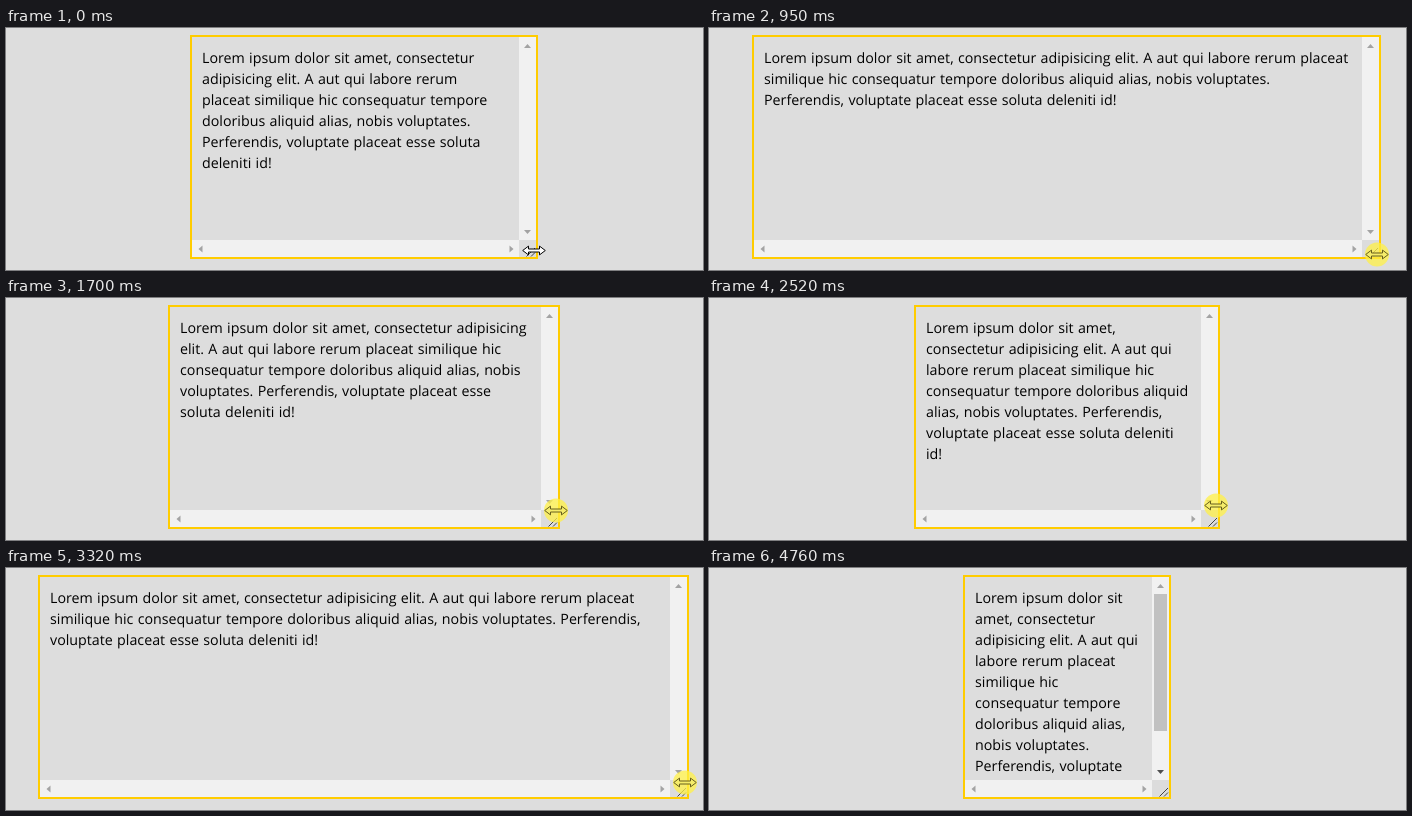
Recreate the animation shown at these times as an HTML page. Size 697 px wide and 242 px high, loop 5.13 s.

```html
<!DOCTYPE html>
<html lang="en">
<head>
<meta charset="utf-8">
<title>Resizable box</title>
<style>
  html, body { margin: 0; width: 100%; height: 100%; overflow: hidden; background: #ddd; }
  body { position: relative; }
  div, svg { position: absolute; box-sizing: border-box; }
  svg { display: block; overflow: visible; }
  #box { top: 7px; height: 224px; border: 2px solid #fc0; overflow: hidden; }
  #view { left: 0; top: 0; right: 17px; height: 203px; overflow: hidden; }
  #text {
    left: 0; right: 0; top: 0; padding: 11px 9.5px 9px 10px;
    font: 14.25px/21px "Open Sans", "Noto Sans", sans-serif;
    word-spacing: .6px; text-rendering: geometricPrecision; color: #000;
  }
  .bar { background: #f1f1f1; }
  #vbar { top: 0; right: 0; width: 17px; height: 203px; }
  #hbar { left: 0; right: 17px; bottom: 0; height: 17px; }
  #corner { right: 0; bottom: 0; width: 17px; height: 17px; background: #dcdcdc; }
  #thumb { left: 2px; width: 13px; top: 17px; background: #c1c1c1; }
  .tri { width: 7px; height: 4px; fill: #a3a3a3; }
  #up { left: 5px; top: 7px; }
  #down { left: 5px; bottom: 6px; transform: rotate(180deg); }
  #left { left: 4.5px; top: 6.5px; transform: rotate(-90deg); }
  #right { right: 4.5px; top: 6.5px; transform: rotate(90deg); }
  #grip { left: 0; top: 0; width: 17px; height: 17px; stroke: #444; fill: none; }
  #cursor { left: 0; top: 0; width: 1px; height: 1px; }
  #sizer { fill: #fff; stroke: #000; }
  .pressed #sizer { fill: #f5ec6a; stroke: #675f1c; }
  #halo { fill: #fff046; fill-opacity: .75; visibility: hidden; }
  .pressed #halo { visibility: visible; }
  #arrow { fill: #fff; stroke: #000; }
</style>
</head>
<body>
<div id="box">
  <div id="view"><div id="text">Lorem ipsum dolor sit amet, consectetur adipisicing elit. A aut qui labore rerum placeat similique hic consequatur tempore doloribus aliquid alias, nobis voluptates. Perferendis, voluptate placeat esse soluta deleniti id!</div></div>
  <div id="vbar" class="bar">
    <svg id="up" class="tri"><path d="M0 4 3.5 0 7 4Z"/></svg>
    <div id="thumb"></div>
    <svg id="down" class="tri"><path d="M0 4 3.5 0 7 4Z"/></svg>
  </div>
  <div id="hbar" class="bar">
    <svg id="left" class="tri"><path d="M0 4 3.5 0 7 4Z"/></svg>
    <svg id="right" class="tri"><path d="M0 4 3.5 0 7 4Z"/></svg>
  </div>
  <div id="corner"><svg id="grip"><path d="M7.5 16.5 16 8M12 16.5 16 12.5"/></svg></div>
</div>
<svg id="cursor">
  <circle id="halo" r="12"/>
  <path id="sizer" d="M-11.3 0-5.5-4.4V-1.5H5.5V-4.4L11.3 0 5.5 4.4V1.5H-5.5V4.4Z"/>
  <path id="arrow" d="M.5.7V16.5L4.1 13 6.5 18.5 8.7 17.6 6.3 12.1H11.3Z"/>
</svg>
<script>
const LOOP = 5130, STEP = 62.5, MID = 358, VIEW_H = 203, TRACK_H = 169;
const IDLE = 70, PRESS = 380, RELEASE = 4570, GONE = 4760;

// Each drag eases to a new box width and pointer height
const drags = [
  { from: 316, to: 1087, width: 658, y: 226 },
  { from: 1386, to: 1859, width: 295, y: 207 },
  { from: 2456, to: 3010, width: 614, y: 216 },
  { from: 3010, to: 3260, width: 651, y: 214 },
  { from: 3506, to: 4080, width: 287, y: 201 },
  { from: 4080, to: 4330, width: 208, y: 197 }
];

const $ = id => document.getElementById(id);
const box = $("box"), text = $("text"), thumb = $("thumb"), cursor = $("cursor");
const show = (el, on) => { el.style.display = on ? "" : "none"; };
const lerp = (a, b, p) => a + (b - a) * p;
const smooth = p => p * p * (3 - 2 * p);

// Progress from 0 to 1, advancing in steps like a screen capture
function progress(t, from, to) {
  const steps = Math.floor((t - from) / STEP);
  return Math.min(1, Math.max(0, steps * STEP / (to - from)));
}

function pose(t) {
  let width = 348, y = 222;
  for (const d of drags) {
    const p = smooth(progress(t, d.from, d.to));
    width = lerp(width, d.width, p);
    y = lerp(y, d.y, p);
  }
  return { width: Math.round(width), y: Math.round(y) };
}

function draw(t) {
  const { width, y } = pose(t);
  const left = Math.floor(MID - width / 2);
  box.style.left = left + "px";
  box.style.width = width + "px";

  const full = text.offsetHeight, scrolls = full > VIEW_H;
  show(thumb, scrolls);
  thumb.style.height = Math.round(TRACK_H * VIEW_H / full) + "px";
  $("down").style.fill = scrolls ? "#505050" : "";

  const leaving = t >= RELEASE, p = progress(t, RELEASE, RELEASE + 2 * STEP);
  const px = leaving ? lerp(470, 517, p) : left + width - 4;
  const py = leaving ? lerp(203, 217, p) : y + .5;
  show(cursor, t < IDLE || (t >= PRESS && t < GONE));
  show($("sizer"), !leaving);
  show($("arrow"), leaving);
  cursor.setAttribute("class", t >= PRESS && !leaving ? "pressed" : "");
  cursor.style.transform = `translate(${px}px, ${py}px)`;
}

const start = performance.now();
function tick() {
  draw((performance.now() - start) % LOOP);
  requestAnimationFrame(tick);
}
tick();
</script>
</body>
</html>
```
